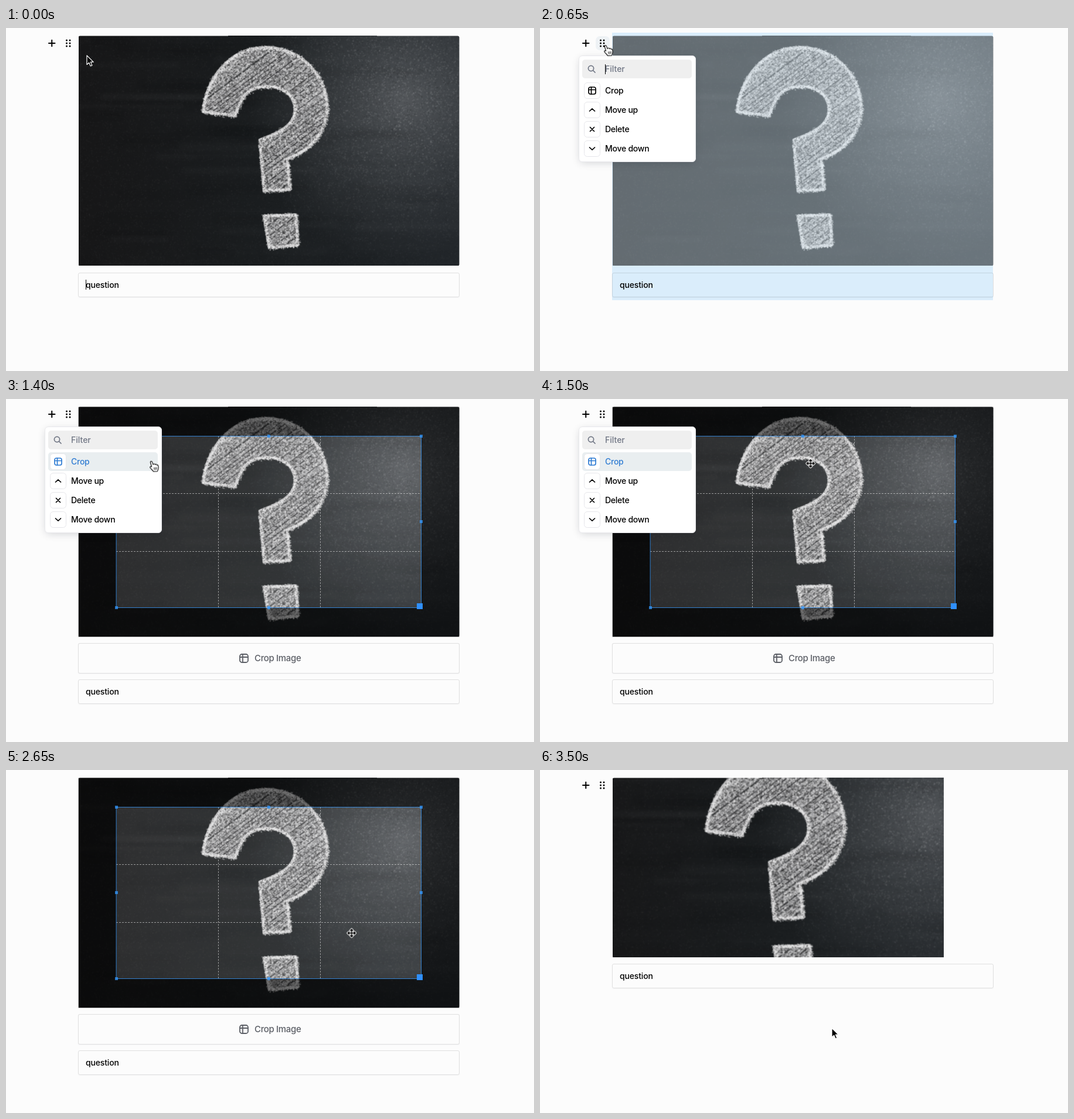
Write an HTML page with a canvas that moves like this. It is 901 px wide and 586 px high and loops after 3.55 s.

```html
<!DOCTYPE html>
<html lang="en">
<head>
<meta charset="utf-8">
<title>Image crop</title>
<style>
html, body { margin: 0; width: 100%; height: 100%; overflow: hidden; background: #fcfcfc; }
body { position: relative; font: 450 14px/1 Inter, "Liberation Sans", sans-serif; letter-spacing: -.15px; color: #000; }
body * { box-sizing: border-box; }
.abs, .anim { position: absolute; }
.anim, g { animation: 3.55s step-end infinite; }
svg { overflow: visible; fill: none; stroke: currentColor; stroke-linecap: round; stroke-linejoin: round; }

#sel { left: 123px; top: 8px; width: 650px; height: 457px; background: #daedfb; animation-name: sel; }
@keyframes sel { 0% { opacity: 0 } 12.676% { opacity: 1 } 39.437%, 100% { opacity: 0 } }

canvas { left: 123px; top: 13px; transform: translate(.5px, .5px); }
#photo { border-radius: 3px; animation-name: photo; }
@keyframes photo { 0% { opacity: 1 } 12.676% { opacity: .6 } 39.437% { opacity: 1 } 95.775%, 100% { opacity: 0 } }
#result { border-radius: 3px 0 0 3px; animation-name: result; }
@keyframes result { 0% { opacity: 0 } 95.775%, 100% { opacity: 1 } }

.field { left: 123px; width: 651px; border: 1px solid rgba(0, 0, 0, .11); border-radius: 3px; box-shadow: 0 1px 2px rgba(18, 30, 57, .04); }
#caption { top: 418px; height: 42px; padding-left: 12px; line-height: 40px; animation-name: caption; }
@keyframes caption { 0% { top: 418px } 39.437% { top: 479px } 95.775%, 100% { top: 331px } }
.caret { width: 1px; height: 17px; background: #000; }
#caret { left: 12px; top: 11px; animation-name: caret; }
@keyframes caret { 0% { opacity: 1 } 12.676%, 100% { opacity: 0 } }

#crop { left: 0; top: 0; animation-name: crop; }
@keyframes crop { 0% { opacity: 0 } 39.437% { opacity: 1 } 95.775%, 100% { opacity: 0 } }
#button { top: 417px; height: 52px; font-size: 15px; letter-spacing: -.35px; line-height: 50px; padding-left: 300px; color: #5c5f66; animation-name: button; }
@keyframes button { 0% { background: #fcfcfc } 85.915%, 100% { background: #f4f9fc } }

#tools { left: 0; top: 0; animation-name: tools; }
@keyframes tools { 0% { opacity: 1 } 49.296% { opacity: 0 } 98.592%, 100% { opacity: 1 } }
#grip { left: 95px; top: 14px; width: 24px; height: 24px; border-radius: 7px; background: #eef2f5; animation-name: grip; }
@keyframes grip { 0% { opacity: 0 } 8.451% { opacity: 1 } 21.127%, 100% { opacity: 0 } }

#menu { left: 66px; top: 47px; width: 200px; height: 182px; border: 1px solid #e8e8eb; border-radius: 6px; background: #fff; box-shadow: 0 3px 15px -3px rgba(13, 20, 33, .2); transform-origin: 0 0; animation-name: menu; }
@keyframes menu {
  0% { opacity: 0; transform: none }
  12.676% { opacity: 0; transform: translateY(-8px) scale(.9); animation-timing-function: ease }
  14.648% { opacity: 1; transform: translateY(2px); animation-timing-function: ease }
  15.493% { opacity: 1; transform: none }
  49.296%, 100% { opacity: 0; transform: none }
}
#filter { left: 5px; top: 6px; width: 187px; height: 32px; border-radius: 5px; background: #efefef; color: #707684; line-height: 32px; padding-left: 39px; letter-spacing: 0; }
#blink { left: 39px; top: 8px; animation-name: blink; }
@keyframes blink { 0% { opacity: 0 } 12.676% { opacity: 1 } 28.169%, 100% { opacity: 0 } }
#hover { left: 5px; top: 43px; width: 187px; height: 32px; border-radius: 5px; background: #e9eef0; animation-name: hover; }
@keyframes hover { 0% { opacity: 0 } 26.761%, 100% { opacity: 1 } }
.item { left: 8px; width: 184px; height: 28px; line-height: 28px; padding-left: 36px; font-weight: 500; letter-spacing: -.25px; }
.item svg { position: absolute; left: 0; top: 0; stroke-width: 1.7; }
.item .box { fill: #fff; stroke: #e6e6ea; stroke-width: 1; }
#cropItem { animation-name: pick; }
@keyframes pick { 0% { color: #000 } 38.028%, 100% { color: #2f7cd3 } }

#cursor { left: 0; top: 0; animation-name: path; animation-timing-function: linear; }
@keyframes path {
  0%, 1.408% { transform: translate(138px, 47px) }
  9.859%, 18.310% { transform: translate(114px, 30px) }
  32.394%, 38.028% { transform: translate(142px, 105px) }
  42.254% { transform: translate(460px, 110px) }
  46.479% { transform: translate(712px, 116px) }
  50.704% { transform: translate(817px, 122px) }
  53.521% { transform: translate(819px, 126px) }
  56.338% { transform: translate(776px, 132px) }
  60.563% { transform: translate(713px, 140px) }
  63.380% { transform: translate(702px, 151px) }
  77.465% { transform: translate(562px, 310px) }
  90.141%, 95.775% { transform: translate(498px, 442px) }
  97.183%, 100% { transform: translate(498px, 441px) }
}
#arrow { animation-name: arrow; }
@keyframes arrow { 0% { opacity: 1 } 8.451% { opacity: 0 } 47.887% { opacity: 1 } 56.338% { opacity: 0 } 95.775%, 100% { opacity: 1 } }
#hand { animation-name: hand; }
@keyframes hand { 0% { opacity: 0 } 8.451% { opacity: 1 } 21.127% { opacity: 0 } 26.761% { opacity: 1 } 40.845% { opacity: 0 } 85.915% { opacity: 1 } 95.775%, 100% { opacity: 0 } }
#beam { animation-name: beam; }
@keyframes beam { 0% { opacity: 0 } 21.127% { opacity: 1 } 26.761%, 100% { opacity: 0 } }
#move { animation-name: move; }
@keyframes move { 0% { opacity: 0 } 40.845% { opacity: 1 } 46.479% { opacity: 0 } 63.380% { opacity: 1 } 81.690%, 100% { opacity: 0 } }
#cross { animation-name: cross; }
@keyframes cross { 0% { opacity: 0 } 46.479% { opacity: 1 } 47.887% { opacity: 0 } 56.338% { opacity: 1 } 63.380% { opacity: 0 } 81.690% { opacity: 1 } 85.915%, 100% { opacity: 0 } }
</style>
</head>
<body>
<div id="sel" class="anim"></div>
<canvas id="photo" class="anim" width="650" height="393"></canvas>
<canvas id="result" class="anim" width="565" height="307"></canvas>
<div id="caption" class="anim field">question<i id="caret" class="anim caret"></i></div>

<div id="crop" class="anim">
  <svg class="abs" width="901" height="586">
    <path d="M123.5 13.5H773.5V406.5H123.5ZM188 63V357H709V63Z" fill="#000" fill-opacity=".5" fill-rule="evenodd" stroke="none"/>
    <path d="M188 63H709V357H188Z" fill="#fff" fill-opacity=".1" stroke="none"/>
    <path d="M188 161.5H709M188 260.5H709M362.5 63V357M536.5 63V357" stroke="#eee" stroke-opacity=".55" stroke-dasharray="3 2" stroke-linecap="butt"/>
    <path d="M188.5 63.5H708.5V356.5H188.5Z" stroke="#39f" stroke-opacity=".75"/>
    <path d="M186 61h5v5h-5zM446 61h5v5h-5zM706 61h5v5h-5zM186 207h5v5h-5zM706 207h5v5h-5zM186 354h5v5h-5zM446 354h5v5h-5z" fill="#39f" fill-opacity=".75" stroke="none"/>
    <path d="M701 349h10v10h-10z" fill="#2f8fff" stroke="none"/>
  </svg>
  <div id="button" class="anim field">Crop Image
    <svg class="abs" style="left:274px;top:17px" width="16" height="16" stroke-width="1.8"><rect x="1" y="1" width="14" height="14" rx="3.5"/><path d="M1 6H15M6 1V15"/></svg>
  </div>
</div>

<div id="tools" class="anim">
  <div id="grip" class="anim"></div>
  <svg class="abs" width="130" height="50" stroke-width="2">
    <path d="M73 26H83.500M78.250 20.750V31.250"/>
    <path d="M103.500 21h0M109 21h0M103.500 26h0M109 26h0M103.500 31h0M109 31h0" stroke-width="3"/>
  </svg>
</div>

<div id="menu" class="anim">
  <div id="filter" class="abs">Filter<i id="blink" class="anim caret"></i>
    <svg class="abs" style="left:9px;top:9px" width="14" height="14" stroke-width="1.7"><circle cx="6" cy="6" r="4.600"/><path d="M9.500 9.500L13 13"/></svg>
  </div>
  <div id="hover" class="anim"></div>
  <div id="cropItem" class="anim item" style="top:45px"><svg width="28" height="28"><rect class="box" x=".5" y=".5" width="27" height="27" rx="5"/><rect x="8" y="8" width="12" height="12" rx="3"/><path d="M8 12.500H20M12.500 8V20"/></svg>Crop</div>
  <div class="abs item" style="top:78px"><svg width="28" height="28"><rect class="box" x=".5" y=".5" width="27" height="27" rx="5"/><path d="M9.500 16L14 11.800L18.500 16"/></svg>Move up</div>
  <div class="abs item" style="top:111px"><svg width="28" height="28"><rect class="box" x=".5" y=".5" width="27" height="27" rx="5"/><path d="M10.500 10.500L17.500 17.500M17.500 10.500L10.500 17.500"/></svg>Delete</div>
  <div class="abs item" style="top:144px"><svg width="28" height="28"><rect class="box" x=".5" y=".5" width="27" height="27" rx="5"/><path d="M9.500 12L14 16.200L18.500 12"/></svg>Move down</div>
</div>

<div id="cursor" class="anim">
  <svg class="abs" style="left:0;top:0" width="1" height="1">
    <defs>
      <path id="four" d="M-6 0H6M0-6V6M-4.500-2L-6.500 0L-4.500 2ZM4.500-2L6.500 0L4.500 2ZM-2-4.500L0-6.500L2-4.500ZM-2 4.500L0 6.500L2 4.500Z"/>
      <path id="plus" d="M-6 .5H7M.5-6V7"/>
    </defs>
    <g id="arrow" fill="#000" stroke="#fff" stroke-width="1.200"><path d="M0 0V15.500L3.700 12.200L6.200 18L8.900 16.900L6.400 11.200H11.200Z"/></g>
    <g id="hand" fill="#fff" stroke="#111" stroke-width="1.200">
      <path d="M-1.500 9L-3.600 2Q-4-.2-2.400-.4Q-1-.5-.4 1.400L1 5.300Q1.400 3.900 2.800 4Q4 4.100 4.400 5.400Q5 4.300 6.300 4.800Q7.200 5.100 7.400 6.200Q8.600 5.400 9.400 6.600Q10.200 8.600 10 11Q9.800 14 8.200 16.800L1.500 17.200Q0 14.800-2 13Q-4.600 10.800-4.400 9.600Q-3.600 8.200-1.500 9Z"/>
      <path d="M2.500 10.500L3 14M4.700 10.200L5 14M6.900 10L7 13.500" stroke-width=".9"/>
    </g>
    <g id="beam" stroke="#111"><path d="M-3-7.500Q0-7.500 0-5V5Q0 7.500-3 7.500M3-7.500Q0-7.500 0-5V5Q0 7.500 3 7.500M-1.500 3H1.500"/></g>
    <g id="move"><use href="#four" stroke="#fff" stroke-width="3.600"/><use href="#four" fill="#000" stroke="#000" stroke-width="1.400"/></g>
    <g id="cross" stroke-linecap="square"><use href="#plus" stroke="#fff" stroke-width="3"/><use href="#plus" stroke="#333"/></g>
  </svg>
</div>

<script>
const MARK = 'M336 143C341 86 382 33 443 33C503 33 549 81 548 137C548 178 519 209 480 224L485 276L440 278L433 191C464 180 493 166 493 140C493 113 470 99 443 100C410 101 400 121 391 150Z';
const DOT = 'M440 321L495 319L498 371L449 375Z';
const photo = document.getElementById('photo');
const ctx = photo.getContext('2d');
const W = photo.width, H = photo.height;

let seed = 7;
function rand() {
  seed = (seed * 1664525 + 1013904223) % 4294967296;
  return seed / 4294967296;
}
const spread = r => (rand() + rand() - 1) * r;

function speck(x, y, size, shade, alpha) {
  ctx.fillStyle = `rgba(${shade},${shade},${shade},${alpha})`;
  ctx.fillRect(x, y, size, size);
}

function board() {
  const base = ctx.createLinearGradient(0, 0, W, 0);
  base.addColorStop(0, '#171718');
  base.addColorStop(.5, '#1b1e20');
  base.addColorStop(1, '#22262a');
  ctx.fillStyle = base;
  ctx.fillRect(0, 0, W, H);
  const glow = ctx.createRadialGradient(555, 110, 0, 555, 110, 270);
  glow.addColorStop(0, 'rgba(125,128,132,.55)');
  glow.addColorStop(.45, 'rgba(110,114,118,.3)');
  glow.addColorStop(1, 'rgba(100,104,108,0)');
  ctx.fillStyle = glow;
  ctx.fillRect(0, 0, W, H);
  // wiped streaks, then the rough surface
  ctx.filter = 'blur(4px)';
  for (let i = 0; i < 70; i++) {
    ctx.fillStyle = rand() < .5 ? 'rgba(255,255,255,.02)' : 'rgba(0,0,0,.07)';
    ctx.fillRect(rand() * W - 80, rand() * H, 60 + rand() * 200, 3 + rand() * 10);
  }
  ctx.filter = 'none';
  for (let i = 0; i < 30000; i++) {
    const x = rand() * W, y = rand() * H;
    const near = Math.max(0, 1 - Math.hypot(x - 555, y - 110) / 270);
    speck(x, y, 1 + rand() * 1.5, rand() < .5 ? 255 : 0, .02 + near * .07);
  }
}

function chalk(d) {
  const shape = new Path2D(d);
  const line = document.createElementNS('http://www.w3.org/2000/svg', 'path');
  line.setAttribute('d', d);
  const length = line.getTotalLength();
  ctx.save();
  ctx.clip(shape);
  ctx.fillStyle = 'rgba(215,213,215,.62)';
  ctx.fill(shape);
  for (let i = 0; i < 30000; i++) {
    const light = rand() < .6;
    speck(330 + rand() * 225, 28 + rand() * 355, 1 + rand() * 1.5, light ? 230 : 40, light ? .5 : .42);
  }
  // broken dark gaps between the diagonal chalk strokes
  for (let c = 370; c < 900; c += 7 + rand() * 7) {
    ctx.strokeStyle = `rgba(28,29,31,${.3 + rand() * .4})`;
    ctx.lineWidth = 1 + rand() * 1.6;
    ctx.setLineDash([4 + rand() * 14, 1 + rand() * 4]);
    ctx.beginPath();
    ctx.moveTo(310, c - 310 * .75);
    ctx.lineTo(570, c - 570 * .75);
    ctx.stroke();
  }
  ctx.restore();
  ctx.lineJoin = 'round';
  ctx.strokeStyle = 'rgba(230,229,230,.8)';
  ctx.lineWidth = 4.5;
  ctx.stroke(shape);
  for (let i = 0; i < length * 4; i++) {
    const p = line.getPointAtLength(rand() * length);
    speck(p.x + spread(4.5), p.y + spread(4.5), .8 + rand() * 1.2, rand() < .75 ? 235 : 70, .6);
  }
}

board();
ctx.translate(-123.5, -13.5);
chalk(MARK);
chalk(DOT);

const out = document.getElementById('result').getContext('2d');
out.setTransform(1.113, 0, 0, 1.113, -76.5, -53.8);
out.drawImage(photo, 0, 0);
</script>
</body>
</html>
```
